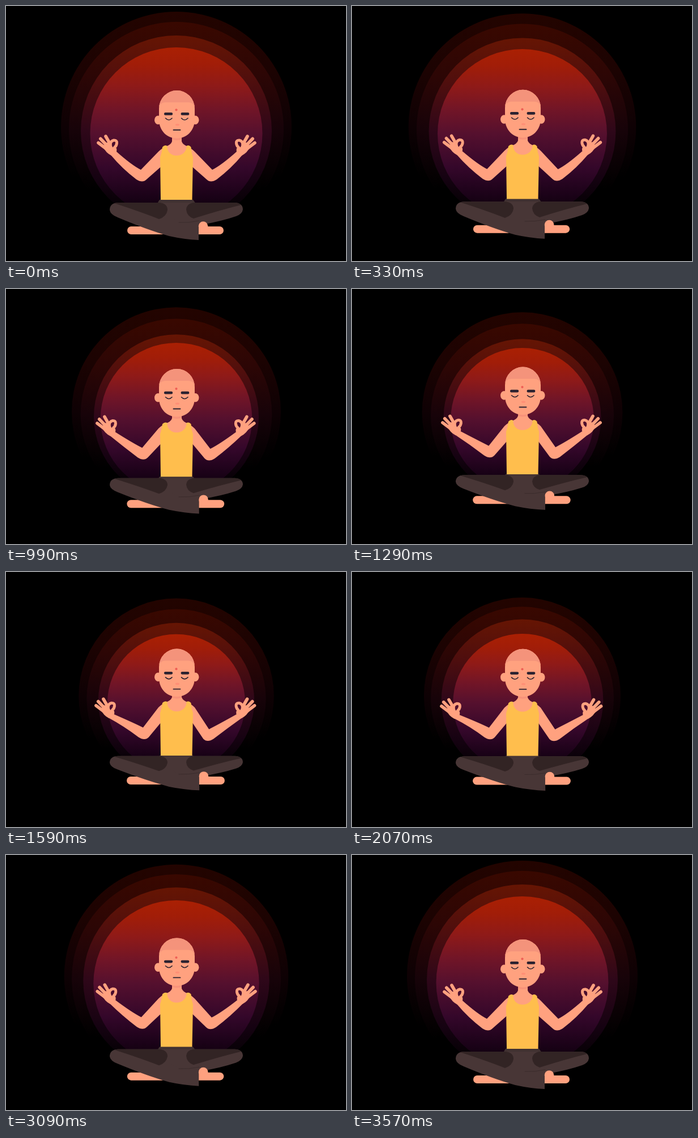
Animation of 600 by 450 pixels, one loop 3.6 s. Source, as an HTML page with a canvas:

```html
<!DOCTYPE html>
<html lang="en">
<head>
<meta charset="utf-8">
<title>Meditation</title>
<style>
  html, body { margin: 0; height: 100%; overflow: hidden; background: #000; }
  canvas { display: block; }
</style>
</head>
<body>
<canvas id="stage" width="600" height="450"></canvas>
<script>
const ctx = document.getElementById('stage').getContext('2d');
const LOOP = 3600;
const SKIN = '#ffa17f', SCALP = '#f4937b', INK = '#2b2230', SHIRT = '#ffbe4d';
const PANTS = '#483636', THIGH = '#322424';

// Eased 0 -> 1 -> 0 over one loop, reaching 1 at time `peak`.
function swell(t, peak = LOOP / 2) {
  const phase = t < peak ? t / peak : (LOOP - t) / (LOOP - peak);
  return (1 - Math.cos(Math.PI * phase)) / 2;
}

function fill(color, d) {
  ctx.fillStyle = color;
  ctx.fill(new Path2D(d));
}

function line(color, width, d, cap = 'round') {
  ctx.strokeStyle = color;
  ctx.lineWidth = width;
  ctx.lineCap = cap;
  ctx.lineJoin = 'round';
  ctx.stroke(new Path2D(d));
}

function ellipse(color, x, y, rx, ry = rx) {
  ctx.fillStyle = color;
  ctx.beginPath();
  ctx.ellipse(x, y, rx, ry, 0, 0, 2 * Math.PI);
  ctx.fill();
}

function group(dx, dy, draw) {
  ctx.save();
  ctx.translate(dx, dy);
  draw();
  ctx.restore();
}

function mirror(draw) {
  ctx.save();
  ctx.translate(602, 0);
  ctx.scale(-1, 1);
  draw();
  ctx.restore();
}

const halos = [
  { top: 10, rise: 37.5, r: 203.5, shrink: 32, peak: 1770,
    stops: [[0, '#230400'], [.25, '#1c0302'], [.5, '#0e0104'], [.72, '#000']] },
  { top: 28, rise: 37.5, r: 189.5, shrink: 31.5, peak: 1650,
    stops: [[0, '#390800'], [.25, '#2c0605'], [.5, '#170309'], [.78, '#000']] },
  { top: 52, rise: 38, r: 168.5, shrink: 31, peak: 1500,
    stops: [[0, '#661503'], [.25, '#4e0e0e'], [.5, '#2e0719'], [.75, '#150211'], [.95, '#000']] },
  { top: 73, rise: 38, r: 152, shrink: 31.5, peak: 1800,
    stops: [[0, '#aa2003'], [.1, '#a11d08'], [.22, '#8f1a18'], [.36, '#711527'],
            [.5, '#55102e'], [.7, '#34072a'], [.86, '#1b0218'], [1, '#060005']] }
];

function drawHalo({ top, rise, r, shrink, peak, stops }, t) {
  const u = swell(t, peak), y = top + rise * u, radius = r - shrink * u;
  const gradient = ctx.createLinearGradient(0, y, 0, y + 2 * radius);
  stops.forEach(([at, color]) => gradient.addColorStop(at, color));
  ellipse(gradient, 300.5, y + radius, radius);
}

function drawHand() {
  fill(SKIN, 'M171 248 L177 241 L185 241 L188 249 L195 251 Q196 256 194 259 L186 264 Q176 259 171 248Z');
  line(SKIN, 5.6, 'M163 241.5 L177 252 M166.8 234.3 L180 248 M176 230 L184 244');
  line(SKIN, 5, 'M183.5 246 Q184.5 238 190 237 Q196 236.5 195.5 242 Q195 247 191.5 249.5 L191 255');
}

// Left arm; hand, shoulder and elbow each follow their own offset.
function drawArm(handX, handY, elbowX, elbowY, shoulderY) {
  const hand = (x, y) => `${x + handX} ${y + handY}`;
  const elbow = (x, y) => `${x + elbowX} ${y + elbowY}`;
  const shoulder = (x, y) => `${x} ${y + shoulderY}`;
  fill(SKIN, `M${shoulder(285, 247)} Q${shoulder(276, 250)} ${shoulder(269, 257)}
    L${elbow(238, 289)} Q${elbow(222, 281)} ${hand(195, 257)} L${hand(185, 263)}
    Q${elbow(205, 287)} ${elbow(230, 306)} Q${elbow(241, 313)} ${elbow(248, 306)}
    L${shoulder(273, 284)} L${shoulder(285, 276)}Z`);
  group(handX, handY, drawHand);
}

function drawTorso() {
  fill(SKIN, 'M293 226 H310 V239 Q312 245 321 248 V270 H282 V248 Q291 245 293 239Z');
  fill('#403131', 'M272 341.5 H329 Q332 343 335 350 V362 H267 V350 Q269 343 272 341.5Z');
  fill(SHIRT, `M276 249 Q280 244.5 284.5 247 C284 257 291 264 301 264 C311 264 319 257 318.5 247
    Q323 244.5 326.5 249 Q327 259 330 267 L328.5 342 H273 L272 267 Q275 259 276 249Z`);
}

function drawLeftFoot(u) {
  line(SKIN, 14, `M${221 - u} 396 H275`);
}

function drawRightFoot(u) {
  fill(SKIN, `M${340 + u} 403 V389 H${377 + 2 * u} a7 7 0 0 1 0 14Z`);
  ellipse(SKIN, 348 + u, 388.5, 8.3);
}

function drawLegs(u) {
  fill(PANTS, `M267 347 H404 Q418 348 418 359 Q417 367 406 371 Q380 380 345 386
    L300 394 L262 376Z`);
  fill(THIGH, 'M330 347 H404 Q411 347 415 351 Q375 361 331 375 Q319 371 318 359 Q319 349 330 347Z');
  fill(PANTS, `M197 347 Q183 348 183 360 Q184 368 197 373 Q249 395 288 406 Q315 412 ${340 + 1.3 * u} 413
    L${340 + u} 385 L306 381 L284 370 L268 347Z`);
  fill(THIGH, 'M197 347 H272 Q285 349 285 360 Q283 372 270 376 Q240 364 191 348Z');
  line('#3b2c2c', 1, 'M305 382 Q322 383 341 379');
}

function drawSkull() {
  fill('#f8937a', 'M293 230 H310 V235 Q301 239 293 235Z');
  fill(SKIN, 'M270 181 A31.5 32 0 0 1 333 181 V200 C333 221 318 233.5 301.5 233.5 C285 233.5 270 221 270 200Z');
  fill(SCALP, 'M270 181 A31.5 32 0 0 1 333 181 Q332 170 322 170 H281 Q271 170 270 181Z');
}

function drawEars() {
  ellipse(SKIN, 268.5, 201.3, 6.5, 7.8);
  ellipse(SKIN, 334, 201.3, 6.5, 7.8);
}

function drawFace() {
  ellipse('#ee5f55', 300.5, 183.3, 2.1);
  line(INK, 4.8, 'M281.3 190.4 H291.8 M310.9 190.4 H321');
  line(INK, 1.6, 'M281.5 198 Q287.5 204 293 198 M309.5 198 Q315 204 321 198');
  ellipse('#ff8f76', 302.5, 209.5, 3.6, 1.8);
  line(INK, 1.9, 'M295.5 218.7 H307.5');
}

function render(t) {
  const u = swell(t), handY = -5.8 * swell(t, 1450), torsoY = -18.5 * u;
  ctx.fillStyle = '#000';
  ctx.fillRect(0, 0, 600, 450);
  halos.forEach(halo => drawHalo(halo, t));

  drawArm(-5.2 * swell(t, 2300), handY, 4 * u, -15 * u, torsoY);
  const rightX = 1.2 * Math.sin(2 * Math.PI * t / LOOP);
  mirror(() => drawArm(rightX, handY, 6 * u, -12 * u, torsoY));

  group(0, torsoY, drawTorso);
  group(0, -29 * u, () => drawLeftFoot(u));
  // Legs flatten slightly while they rise.
  group(0, 347 - 23 * u, () => {
    ctx.scale(1, 1 - .085 * u);
    ctx.translate(0, -347);
    drawLegs(u);
  });
  group(0, -29 * u, () => drawRightFoot(u));

  // Ears and face shift against the skull as the head nods.
  group(0, -16.5 * u, drawEars);
  group(0, -14 * u, drawSkull);
  group(0, -12.5 * u, drawFace);
}

function tick() {
  render(performance.now() % LOOP);
  requestAnimationFrame(tick);
}
tick();
</script>
</body>
</html>
```
